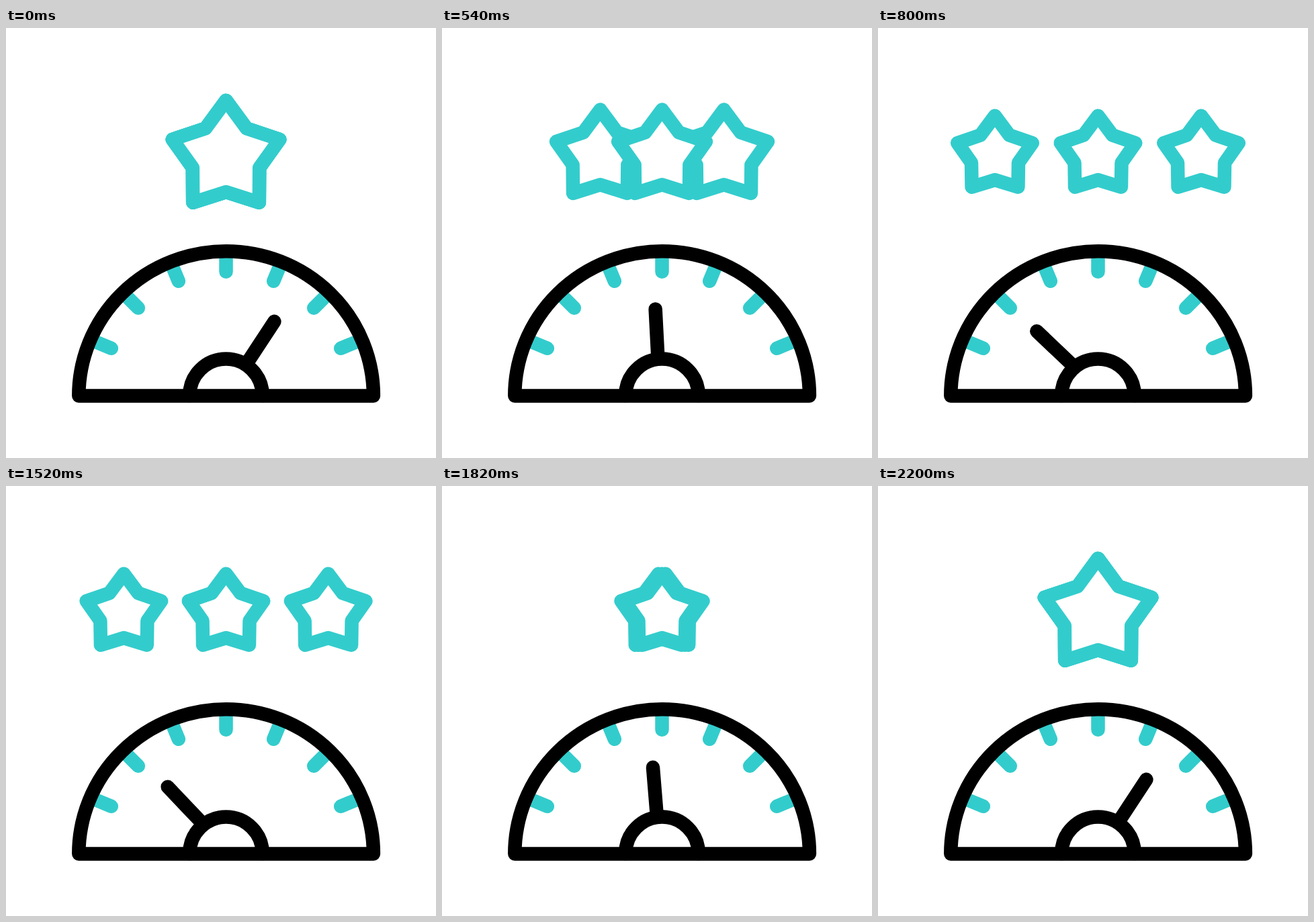
An HTML page for the animation above (2400 ms loop, 640 by 640 pixels).

```html
<!DOCTYPE html>
<html lang="en">
<head>
<meta charset="utf-8">
<title>Rating gauge</title>
<style>
  html, body { margin: 0; width: 100%; height: 100%; overflow: hidden; background: #fff; }
  svg { display: block; width: 100%; height: 100%; }
  path { fill: none; stroke-width: 20.5; stroke-linecap: round; stroke-linejoin: round; }
  .teal { stroke: #3cc; }
  .black { stroke: #000; }
  .star { fill: #fff; }
</style>
</head>
<body>
<svg viewBox="0 0 640 640">
  <path class="teal star"/>
  <path class="teal star"/>
  <path class="teal star"/>
  <path class="teal" id="ticks"/>
  <path class="black" d="M108.3 547.5A219.3 215.3 0 0 1 546.9 547.5Z"/>
  <path class="black" d="M273.2 547A54.3 54.5 0 0 1 381.8 547"/>
  <path class="black" id="needle"/>
</svg>
<script>
const LOOP = 2400, STEP = 20, CX = 327.5, BASE = 547.5;
const stars = document.querySelectorAll('.star');
const needle = document.getElementById('needle');

const rad = deg => deg * Math.PI / 180;
const lerp = (a, b, p) => a + (b - a) * p;
const span = (t, from, to) => Math.min(1, Math.max(0, (t - from) / (to - from)));
const smooth = u => u * u * (3 - 2 * u);
const sag = (u, k) => u - k * u * (1 - u);

// Point at a clockwise angle from straight up
const polar = (x, y, r, deg) => [x + r * Math.sin(rad(deg)), y - r * Math.cos(rad(deg))];
const line = points => 'M' + points.map(p => p.map(v => v.toFixed(2)).join(' ')).join('L');

function starPath(x, y, outer, inner) {
  const points = [];
  for (let i = 0; i < 10; i++) points.push(polar(x, y, i % 2 ? inner : outer, i * 36));
  return line(points) + 'Z';
}

function drawTicks() {
  let d = '';
  for (let a = -67.5; a <= 67.5; a += 22.5) {
    d += line([polar(CX, BASE, 212, a), polar(CX, BASE, 184.8, a)]);
  }
  document.getElementById('ticks').setAttribute('d', d);
}

function drawStars(spread, shrink) {
  const y = lerp(191.8, 189.3, shrink);
  const outer = lerp(83.9, 58.6, shrink);
  const inner = lerp(52.2, 36.8, shrink);
  [-1, 1, 0].forEach((side, i) => {
    stars[i].setAttribute('d', starPath(CX + side * 153.5 * spread, y, outer, inner));
  });
}

// The tip follows a wide arc while the needle tilts slightly more than the arc
function drawNeedle(p) {
  const a = lerp(29.7, -39.8, p);
  const tilt = 1.8 + 1.125 * a - 0.0022 * a * a;
  const tip = polar(328.2, 561.6, 143.6, a);
  needle.setAttribute('d', line([tip, polar(...tip, -71, tilt)]));
}

function render(t) {
  let spread, shrink, swing;
  if (t < 1500) {
    const u = span(t, 200, 800);
    spread = shrink = smooth(u);
    swing = sag(u, 0.32);
  } else {
    spread = 1 - smooth(span(t, 1500, 1860));
    shrink = 1 - smooth(span(t, 1860, 2200));
    swing = sag(1 - span(t, 1500, 2200), 0.135);
  }
  drawStars(spread, shrink);
  drawNeedle(swing);
}

const start = performance.now();
function frame() {
  const t = (performance.now() - start) % LOOP;
  render(Math.floor(t / STEP) * STEP);
  requestAnimationFrame(frame);
}

drawTicks();
frame();
</script>
</body>
</html>
```
